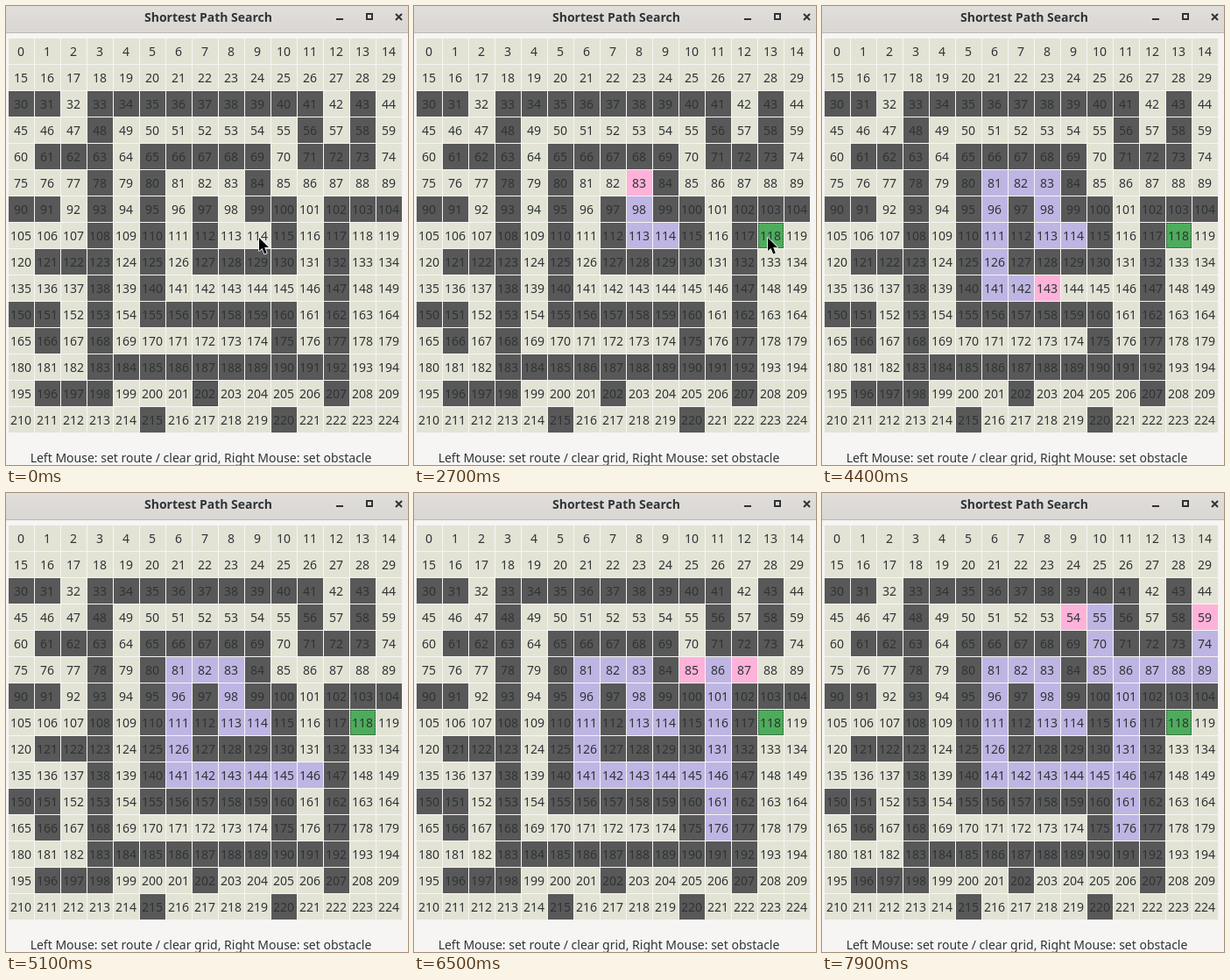
Recreate the animation shown at these times as an HTML page with a canvas. Size 459 by 523 pixels, loop 8 s.

```html
<!DOCTYPE html>
<html lang="en">
<head>
<meta charset="utf-8">
<title>Shortest Path Search</title>
<style>
  html, body { margin: 0; width: 100%; height: 100%; overflow: hidden; background: #f6f5f4; }
  canvas { display: block; }
</style>
</head>
<body>
<canvas id="stage" width="459" height="523"></canvas>
<script>
const ctx = document.getElementById('stage').getContext('2d');
const LOOP = 8000, SIDE = 15, PITCH = 30, SIZE = 29, LEFT = 3, TOP = 37;
const START = 114, GOAL = 118, LAST_WALL = 202;
const INK = '#2e3436';
const COLORS = {
  free: '#e3e3d5', wall: '#585858', route: '#4dac5b',
  queued: '#ffb2d9', visited: '#bfb5e3'
};

const maze = [
  '...............',
  '...............',
  '##.#########.#.',
  '...#.......#.#.',
  '.###.#####.###.',
  '...#.#...#.....',
  '##.#.#.#.##.###',
  '...#.#.#..#.#..',
  '.###.#.####.#..',
  '...#.#......#..',
  '##.#.######.#..',
  '.#.#......#.#..',
  '...##########..',
  '.###...#....#..',
  '.....#....#....'
].join('');

// Breadth-first search, logged as one colour change per step.
function search(start) {
  const log = [], queue = [start], seen = new Set(queue);
  while (queue.length) {
    const cell = queue.shift();
    log.push([cell, 'visited']);
    for (const [dx, dy] of [[0, -1], [1, 0], [0, 1], [-1, 0]]) {
      const x = cell % SIDE + dx, y = Math.floor(cell / SIDE) + dy;
      const next = y * SIDE + x;
      if (x < 0 || y < 0 || x >= SIDE || y >= SIDE) continue;
      if (maze[next] === '#' || seen.has(next)) continue;
      seen.add(next);
      queue.push(next);
      log.push([next, 'queued']);
    }
  }
  return log;
}
const steps = search(START);

function stepCount(t) {
  if (t < 2200) return 0;
  if (t < 2700) return Math.min(3, Math.floor((t - 2200) / 100) + 1);
  if (t < 2900) return 6;
  return Math.floor((t - 2300) / 100) + 1;
}

function cellStates(t) {
  const states = Array.from(maze, c => c === '#' ? 'wall' : 'free');
  if (t >= 700) states[START] = 'route';
  for (const [cell, state] of steps.slice(0, stepCount(t))) states[cell] = state;
  if (t >= 2200) states[GOAL] = 'route';
  return states;
}

function write(text, x, y, weight = 400) {
  ctx.font = `${weight} 14px "Noto Sans", sans-serif`;
  ctx.fillStyle = INK;
  ctx.fillText(text, x, y);
}

function drawTitleBar() {
  const fill = ctx.createLinearGradient(0, 0, 0, 30);
  fill.addColorStop(0, '#e1dedb');
  fill.addColorStop(1, '#dad6d2');
  ctx.fillStyle = fill;
  ctx.fillRect(0, 0, 459, 30);
  ctx.fillStyle = '#bfb8b1';
  ctx.fillRect(0, 30, 459, 1);
  write('Shortest Path Search', 231, 18, 600);

  ctx.fillRect(377, 14, 8, 2);
  ctx.strokeStyle = INK;
  ctx.lineWidth = 2;
  ctx.strokeRect(412, 9, 6, 6);
  ctx.beginPath();
  ctx.moveTo(445, 9);
  ctx.lineTo(452, 16);
  ctx.moveTo(452, 9);
  ctx.lineTo(445, 16);
  ctx.stroke();
}

function drawFocus(x, y) {
  ctx.save();
  ctx.strokeStyle = 'rgba(46, 52, 54, 0.7)';
  ctx.lineWidth = 1;
  ctx.setLineDash([2, 1]);
  ctx.strokeRect(x + 0.5, y + 0.5, SIZE - 1, SIZE - 1);
  ctx.restore();
}

function drawGrid(t) {
  const focus = t < 700 ? LAST_WALL : t < 2200 ? START : GOAL;
  cellStates(t).forEach((state, i) => {
    const x = LEFT + i % SIDE * PITCH, y = TOP + Math.floor(i / SIDE) * PITCH;
    ctx.fillStyle = COLORS[state];
    ctx.fillRect(x, y, SIZE, SIZE);
    if (i === focus) drawFocus(x, y);
    write(i, x + 14, y + 20);
  });
}

function drawPointer(t) {
  if (t >= 4200) return;
  const p = Math.max(0, Math.min(1, (Math.floor(t / 100) - 10) / 6));
  const ease = p * p * (3 - 2 * p);
  ctx.save();
  ctx.translate(288 + Math.round(115 * ease), 263 + Math.round(14 * Math.sin(Math.PI * ease)));
  ctx.beginPath();
  for (const [x, y] of [[1, 1], [1, 16], [4.5, 13], [7.2, 19.5], [9.8, 18.4], [7.2, 12], [12, 12]]) {
    ctx.lineTo(x, y);
  }
  ctx.closePath();
  ctx.lineJoin = 'round';
  ctx.lineWidth = 1.6;
  ctx.strokeStyle = '#fff';
  ctx.stroke();
  ctx.fillStyle = '#000';
  ctx.fill();
  ctx.restore();
}

function draw(t) {
  ctx.fillStyle = '#f6f5f4';
  ctx.fillRect(0, 0, 459, 523);
  ctx.textAlign = 'center';
  drawTitleBar();
  drawGrid(t);
  write('Left Mouse: set route / clear grid, Right Mouse: set obstacle', 222.5, 520);
  drawPointer(t);
}

const begin = performance.now();
function tick() {
  draw((performance.now() - begin) % LOOP);
  requestAnimationFrame(tick);
}
tick();
</script>
</body>
</html>
```
